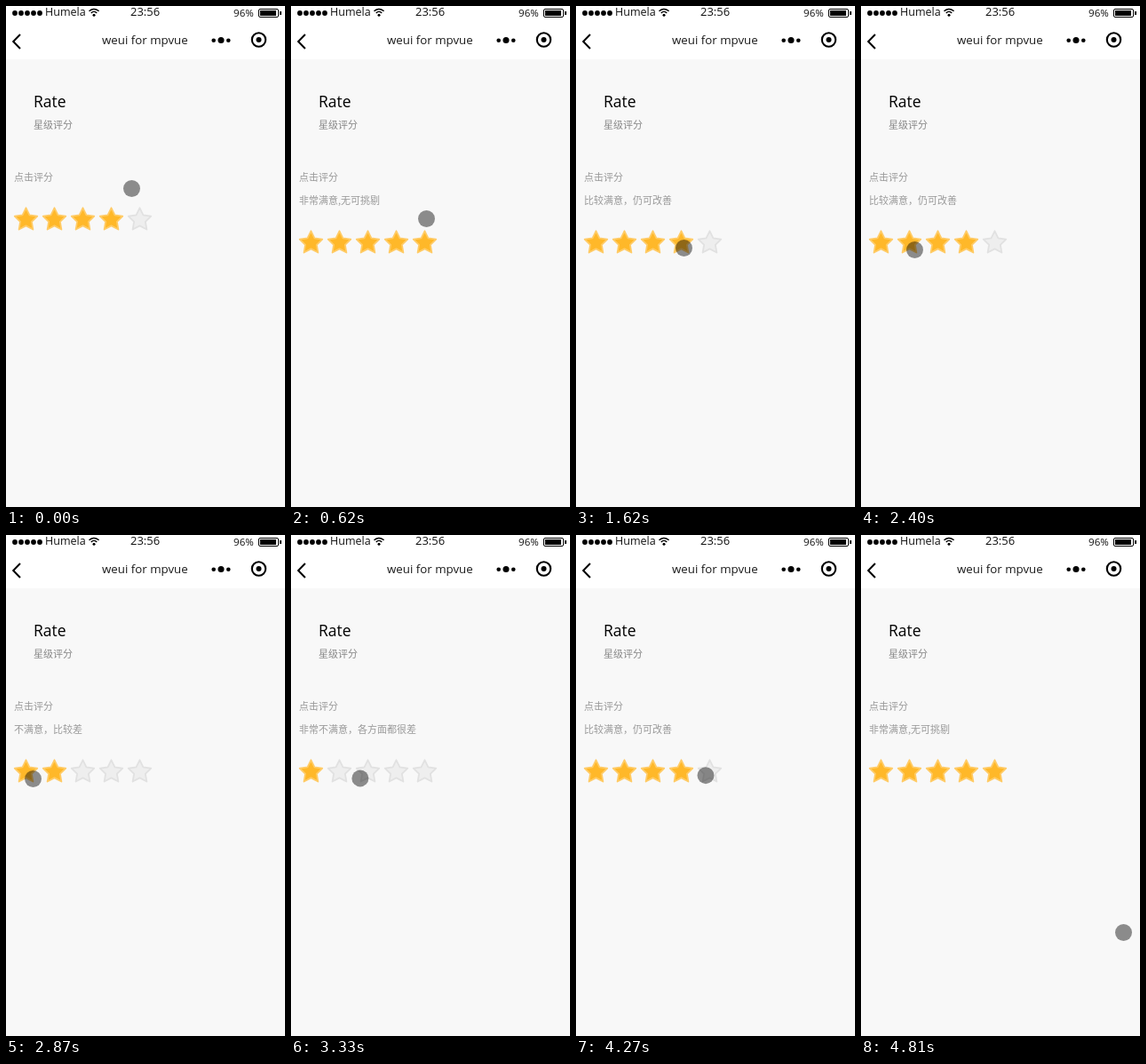
Recreate the animation shown at these times as an HTML page with a canvas. Size 314x564 px, loop 4.88 s.

```html
<!DOCTYPE html>
<html lang="zh-CN">
<head>
<meta charset="utf-8">
<title>Rate</title>
<style>
html, body { margin: 0; width: 100%; height: 100%; overflow: hidden; background: #f8f8f8; }
canvas { display: block; width: 314px; height: 564px; }
</style>
</head>
<body>
<canvas id="stage"></canvas>
<script>
const W = 314, H = 564, LOOP = 4880;
const LATIN = '"Open Sans", "Noto Sans", sans-serif';
const CJK = '"Noto Sans CJK SC", "Noto Sans CJK", sans-serif';
const LABELS = {
  1: '非常不满意，各方面都很差',
  2: '不满意，比较差',
  4: '比较满意，仍可改善',
  5: '非常满意,无可挑剔'
};

// Pointer moves: first and last step time, step count, end point, rating set by a tap
const START = { x: 141.5, y: 205.5 };
const MOVES = [
  { from: 80, to: 310, steps: 4, x: 154.5, y: 238 },
  { from: 390, to: 390, steps: 1, x: 152.5, y: 239.5 },
  { from: 620, to: 1080, steps: 7, x: 125.5, y: 255.5, rate: 5 },
  { from: 1150, to: 1310, steps: 3, x: 119.5, y: 271.5 },
  { from: 1390, to: 1390, steps: 1, x: 121.5, y: 272.5 },
  { from: 1620, to: 2080, steps: 7, x: 75.5, y: 273.5, rate: 4 },
  { from: 2150, to: 2230, steps: 2, x: 59.5, y: 273 },
  { from: 2400, to: 2400, steps: 1, x: 60.5, y: 274.5 },
  { from: 2550, to: 2870, steps: 5, x: 30.5, y: 274.5, rate: 2 },
  { from: 3100, to: 3480, steps: 6, x: 109.5, y: 273.5, rate: 1 },
  { from: 3650, to: 3800, steps: 3, x: 114.5, y: 272.5 },
  { from: 4030, to: 4350, steps: 5, x: 156.5, y: 270, rate: 4 },
  { from: 4660, to: 4810, steps: 3, x: 295.5, y: 447.5, rate: 5 }
];

const canvas = document.getElementById('stage');
const ctx = canvas.getContext('2d');
const dpr = window.devicePixelRatio || 1;
canvas.width = W * dpr;
canvas.height = H * dpr;
ctx.scale(dpr, dpr);

function stateAt(time) {
  let { x, y } = START, rate = 4, label = '';
  for (const m of MOVES) {
    if (time < m.from) break;
    if (m.rate) {
      rate = m.rate;
      label = LABELS[rate];
    }
    const gap = (m.to - m.from) / (m.steps - 1) || 1;
    const step = Math.min(m.steps - 1, Math.floor((time - m.from + 4) / gap));
    // A tap holds the pointer still on its first step
    const p = m.rate ? step / (m.steps - 1) : (step + 1) / m.steps;
    x += (m.x - x) * p;
    y += (m.y - y) * p;
  }
  return { x, y, rate, label };
}

function disc(x, y, r, color) {
  ctx.fillStyle = color;
  ctx.beginPath();
  ctx.arc(x, y, r, 0, Math.PI * 2);
  ctx.fill();
}

function text(str, x, y, size, color, family = LATIN) {
  ctx.font = `${size}px ${family}`;
  ctx.fillStyle = color;
  ctx.fillText(str, x, y);
}

function star(x, y, on) {
  ctx.beginPath();
  for (let i = 0; i < 10; i++) {
    const r = i % 2 ? 6.7 : 13.4;
    const a = i * Math.PI / 5;
    ctx.lineTo(x + r * Math.sin(a), y - r * Math.cos(a));
  }
  ctx.closePath();
  ctx.fillStyle = on ? '#ffb829' : '#eeeeee';
  ctx.strokeStyle = on ? '#ffcb66' : '#e1e1e1';
  ctx.lineWidth = 1.8;
  ctx.lineJoin = 'round';
  ctx.fill();
  ctx.stroke();
}

function statusBar() {
  for (let i = 0; i < 5; i++) disc(10 + i * 7, 8, 2.9, '#000');
  text('Humela', 44, 11, 12.5, '#111');

  ctx.strokeStyle = '#000';
  ctx.lineWidth = 1.5;
  for (const r of [4.2, 7.3]) {
    ctx.beginPath();
    ctx.arc(99, 10.7, r, -Math.PI * 0.77, -Math.PI * 0.23);
    ctx.stroke();
  }
  disc(99, 10.3, 1.5, '#000');

  text('23:56', 140, 11, 13, '#111');
  text('96%', 256, 12, 11.6, '#111');

  ctx.lineWidth = 1;
  ctx.beginPath();
  ctx.roundRect(284.5, 3.5, 22, 9, 1.5);
  ctx.stroke();
  ctx.fillStyle = '#000';
  ctx.fillRect(286, 5, 18, 6);
  ctx.fillRect(308, 6, 2, 4);
}

function navBar() {
  ctx.strokeStyle = '#000';
  ctx.lineJoin = 'miter';
  ctx.lineWidth = 2;
  ctx.beginPath();
  ctx.moveTo(16, 32);
  ctx.lineTo(8.2, 40);
  ctx.lineTo(16, 48);
  ctx.stroke();

  text('weui for mpvue', 108, 43, 13.3, '#1a1a1a');

  disc(233.7, 38.7, 2.3, '#000');
  disc(242, 38.5, 3.5, '#000');
  disc(250.3, 38.7, 2.3, '#000');
  ctx.lineWidth = 2.1;
  ctx.beginPath();
  ctx.arc(284.5, 38, 7.7, 0, Math.PI * 2);
  ctx.stroke();
  disc(284.5, 38, 3, '#000');
}

function draw(time) {
  const { x, y, rate, label } = stateAt(time);
  ctx.fillStyle = '#f8f8f8';
  ctx.fillRect(0, 0, W, H);
  ctx.fillStyle = '#fff';
  ctx.fillRect(0, 0, W, 60);
  statusBar();
  navBar();

  text('Rate', 31, 114, 17.5, '#000');
  text('星级评分', 31, 138, 11, '#888', CJK);
  text('点击评分', 9, 197, 11, '#999', CJK);
  if (label) text(label, 9, 223, 11, '#999', CJK);

  const rowY = label ? 266.7 : 240.7;
  for (let i = 0; i < 5; i++) star(22.5 + i * 32, rowY, i < rate);

  disc(x, y, 9.5, 'rgba(0, 0, 0, 0.44)');
}

const begin = performance.now();
function tick() {
  draw((performance.now() - begin) % LOOP);
  requestAnimationFrame(tick);
}
tick();
</script>
</body>
</html>
```
